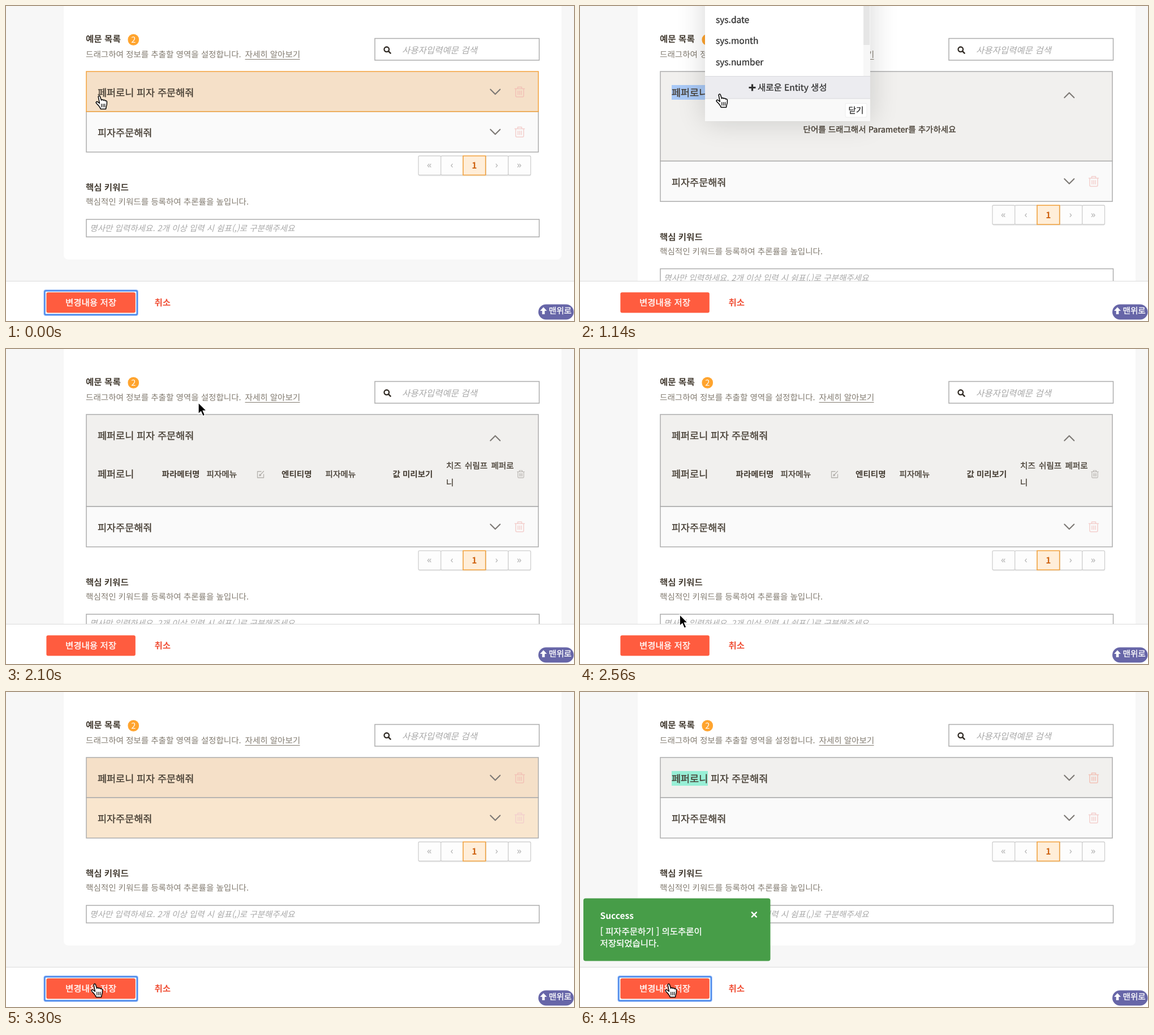
An HTML page for the animation above (4160 ms loop, 1004 px wide and 558 px high).

```html
<!DOCTYPE html>
<html lang="ko">
<head>
<meta charset="utf-8">
<title>예문 목록</title>
<style>
html, body { margin: 0; width: 100%; height: 100%; overflow: hidden; background: #f7f7f7; }
svg { display: block; width: 1004px; height: 558px; }
text {
  font-family: "Noto Sans CJK KR", "Noto Sans KR", "Noto Sans CJK JP", sans-serif;
  white-space: pre;
  text-rendering: geometricPrecision;
}
.b { font-weight: 700; }
.m { stroke-width: .35px; }
.i { font-style: italic; }
.line { fill: none; stroke-linecap: round; stroke-linejoin: round; }
.page { font-family: "Noto Sans", sans-serif; text-anchor: middle; }
</style>
</head>
<body>
<svg id="stage" viewBox="0 0 1004 558"></svg>
<script>
const LOOP = 4160;
const INK = '#453d33', SOFT = '#827b70', GRAY = '#adadad', HINT = '#a9a9a9';

// Class "m" thickens the regular weight with a hairline in the text colour.
const text = (x, y, size, fill, str, cls = '', more = '') =>
  `<text x="${x}" y="${y}" font-size="${size}" fill="${fill}" class="${cls}" ${cls === 'm' ? `stroke="${fill}"` : ''} ${more}>${str}</text>`;
const rect = (x, y, w, h, fill, more = '') =>
  `<rect x="${x}" y="${y}" width="${w}" height="${h}" fill="${fill}" ${more}/>`;
const line = (d, color, width, more = '') =>
  `<path class="line" d="${d}" stroke="${color}" stroke-width="${width}" ${more}/>`;
const group = (id, body, more = '') => `<g id="${id}" ${more}>${body}</g>`;
const frame = `stroke="${GRAY}" stroke-width="1.5"`;

const trash = (x, y, color, scale = 1) => line(
  'M-8.5 -5.5H8.5M-3.5 -5.5V-8.5H3.5V-5.5M-7 -5.5V7Q-7 9 -5 9H5Q7 9 7 7V-5.5M-3 -1.5V5M0 -1.5V5M3 -1.5V5',
  color, 1.5, `transform="translate(${x} ${y}) scale(${scale})"`);
const chevron = (x, y, dy) => line(`M${x - 8.5} ${y - dy}l8.5 ${2 * dy}l8.5 ${-2 * dy}`, '#7d7975', 2.1);

const header =
  text(141, 64, 15.6, INK, '예문 목록', 'b') +
  '<rect x="215.500" y="49.800" width="19.500" height="20" rx="9.500" fill="#ffa42e"/>' +
  text(225.3, 65.2, 14.5, '#fff', '2', '', 'text-anchor="middle"') +
  text(141, 91.3, 14.55, SOFT, '드래그하여 정보를 추출할 영역을 설정합니다.') +
  text(422.5, 91.3, 14.55, SOFT, '자세히 알아보기') +
  rect(422.5, 94, 97, 1, SOFT) +
  rect(652, 57.5, 290.5, 38.5, '#fff', frame) +
  '<circle cx="672.800" cy="76.800" r="4.300" fill="none" stroke="#332d27" stroke-width="2.300"/>' +
  line('M676.200 80.200l3.400 3.400', '#332d27', 2.6) +
  text(700, 84, 15.5, HINT, '사용자입력예문 검색', 'i');

const cells = ['«', '‹', '1', '›', '»'].map((s, k) => {
  const x = 729 + k * 39.7, mid = x + 19.8;
  return k === 2 ? '' :
    rect(x, 265.5, 39.7, 34, '#fdfdfd', 'rx="2" stroke="#cfcfcf" stroke-width="1.300"') +
    text(mid - .5, 287.3, 16.5, '#b2b2b2', s, 'page');
}).join('');

const below =
  rect(142, 187, 799, 71.7, '#fafafa', `id="row2" ${frame}`) +
  text(162, 231, 17.45, INK, '피자주문해줘', 'm') +
  chevron(864.8, 223, 4.3) + trash(908, 223, '#f3cfcd') +
  rect(729, 268, 199, 33.5, '#000', 'rx="3" opacity=".07"') + cells +
  rect(808, 265.5, 39.7, 34, '#ffeed9', 'stroke="#f2a443" stroke-width="1.600"') +
  text(827.8, 288, 15.5, '#cf6413', '1', 'b', 'text-anchor="middle"') +
  text(141, 327.3, 15.5, INK, '핵심 키워드', 'b') +
  text(141, 352.3, 14.55, SOFT, '핵심적인 키워드를 등록하여 추론률을 높입니다.') +
  rect(142, 378, 800.5, 31, '#fff', frame) +
  text(148, 399, 14.55, HINT, '명사만 입력하세요. 2개 이상 입력 시 쉼표(,)로 구분해주세요', 'i');

const param =
  text(162, 228.3, 17.45, INK, '페퍼로니', 'm') +
  text(275.5, 227.3, 14.55, INK, '파라메터명', 'b') +
  text(354.5, 227.3, 14.55, INK, '피자메뉴', 'm') +
  line('M451 217H444.500V228H455.500V222M448 224.500L455.500 216.500M448 224.500l.5 -2.500M448 224.500l2.500 -.5', '#b3b0ac', 1.3) +
  text(487, 227.3, 14.55, INK, '엔티티명', 'b') +
  text(564.5, 227.3, 14.55, INK, '피자메뉴', 'm') +
  text(683.5, 227.3, 14.55, INK, '값 미리보기', 'b') +
  text(778, 212.3, 14.55, INK, '치즈 쉬림프 페퍼로', 'm', 'word-spacing="2.200"') +
  text(778, 241.5, 14.55, INK, '니', 'm') +
  trash(910, 221.5, '#b8b4b0', .74);

const popup =
  rect(221, -60, 292, 264, '#000', 'filter="url(#wide)" opacity=".16"') +
  rect(221, -10, 292, 134, '#fff') +
  rect(501, 0, 12, 124, '#f7f7f7') + rect(501, 0, 11, 69, '#e6e6e6') +
  ['date', 'month', 'number'].map((s, k) => text(240, 30.3 + k * 37.1, 15.5, '#333', 'sys.' + s, 'm')).join('') +
  rect(221, 124, 292, 40, '#ececf0') + rect(221, 124, 292, 1, '#d9d9dd') +
  rect(221, 164, 292, 40, '#f9f9f9') + rect(221, 163.5, 292, 1, '#d9d9dd') +
  '<path d="M304.500 138.500v12M298.500 144.500h12" stroke="#333" stroke-width="3.200"/>' +
  text(314, 150, 15.5, '#333', '새로운 Entity 생성', 'm') +
  rect(469, 172.5, 38, 24.5, '#fff', 'rx="2" stroke="#ececec"') +
  text(474.5, 190.3, 14.55, '#333', '닫기', 'm');

const footer =
  rect(0, 487, 1004, 71, '#fff') + rect(0, 487, 1004, 1, '#dcdcdc') +
  group('hover',
    rect(68, 504, 164, 43, '#f3f4f7', 'rx="2"') +
    rect(71, 510, 158, 37, '#000', 'rx="3" filter="url(#near)" opacity=".48"')) +
  group('focus',
    rect(68.3, 504.3, 163.6, 42.6, '#fff', 'rx="2" stroke="#a9c8fa" stroke-width="4"') +
    rect(68.5, 504.5, 163.2, 42.2, '#fff', 'rx="2" stroke="#4a88ea" stroke-width="2.400"')) +
  rect(71.4, 507.2, 157.4, 36.4, '#ff5c3f', 'rx="3"') +
  text(105, 531.3, 15.5, '#fff', '변경내용 저장', 'm') +
  text(262.5, 531.3, 15.5, '#f0533a', '취소', 'b') +
  rect(941, 528.5, 62.5, 27, '#6766a8', 'rx="13.500"') +
  '<path d="M950 533.500l6 6.500h-3.700v6h-4.600v-6h-3.700z" fill="#fff"/>' +
  text(959.5, 544.5, 14.55, '#fff', '맨위로', 'm');

const toast =
  rect(6, 365.5, 330.5, 111, '#479d48', 'rx="4"') +
  text(35.5, 402, 15.5, '#fff', 'Success', 'b') +
  line('M303.800 390.300l8 8m0 -8l-8 8', '#fff', 2.4) +
  text(35.5, 429.5, 15.5, '#fff', '[ 피자주문하기 ] 의도추론이', 'm') +
  text(35.5, 451.3, 15.5, '#fff', '저장되었습니다.', 'm');

const edge = 'stroke="#000" stroke-width="1.500" stroke-linejoin="round"';
const hand =
  `<path fill="#fff" ${edge} d="M-.8 2.200C-1.400 0 1.600 -.8 2.400 1.400L4.600 8c.4-1.600 3-1.600 3.400.2.800-1.200 3-.8 3.200.8 1-.8 3.200-.2 3.200 1.600.2 3.400.2 5.200-1 8.200L12.400 23.500H3.400C2 19.600-1.400 16-4.400 13.200-5.800 11.400-3.600 9.400-1.600 11l3 2.400z"/>` +
  line('M4.800 14.500v5.500M7.800 14.500v5.500M10.600 14.500v5.500', '#000', 1.2);
const arrow =
  '<path fill="#000" stroke="#fff" stroke-width="1.300" d="M0 0V20L4.600 15.800L8 23.800L11.600 22.200L8.200 14.400H14.300Z"/>';

const stage = document.getElementById('stage');
stage.innerHTML =
  `<defs>
    <filter id="wide" x="-50%" y="-50%" width="200%" height="200%"><feGaussianBlur stdDeviation="26"/></filter>
    <filter id="near" x="-20%" y="-50%" width="140%" height="200%"><feGaussianBlur stdDeviation="3"/></filter>
  </defs>` +
  rect(0, 0, 1004, 558, '#f7f7f7') +
  rect(102, -20, 880, 469, '#fff', 'id="card" rx="8"') +
  header +
  group('below', below) +
  rect(142, 116, 799, 71, '#f1f0ee', 'id="row1" stroke-width="1.500"') +
  rect(162, 140, 64, 26, '#a9c9f6', 'id="mark"') +
  text(162, 159.7, 17.45, INK, '페퍼로니 피자 주문해줘', 'm') +
  group('closed', chevron(864.8, 152, 4.3) + trash(908, 152, '#f2c1b6')) +
  group('opened', chevron(864.8, 158, -4.3)) +
  group('guide', text(394.5, 224, 14.55, INK, '단어를 드래그해서 Parameter를 추가하세요', 'm')) +
  group('param', param) +
  group('popup', popup) +
  footer +
  group('toast', toast) +
  group('hand', hand) + group('arrow', arrow);

const el = {};
stage.querySelectorAll('[id]').forEach(n => el[n.id] = n);

const clamp = v => Math.max(0, Math.min(1, v));
const ease = v => v * v * (3 - 2 * v);
const ramp = (t, a, b) => ease(clamp((t - a) / (b - a)));

// Each key is [time, ...values].
function track(keys, t, curve = ease) {
  let k = 0;
  while (k < keys.length - 2 && t >= keys[k + 1][0]) k++;
  const [a, b] = [keys[k], keys[k + 1]];
  const p = curve(clamp((t - a[0]) / (b[0] - a[0])));
  return a.slice(1).map((v, n) => v + (b[n + 1] - v) * p);
}

function mix(from, to, p) {
  return `rgb(${from.map((v, n) => Math.round(v + (to[n] - v) * p))})`;
}

const path = [
  [0, 164, 159], [420, 164, 159], [580, 163, 154], [840, 226, 153], [960, 226, 153],
  [1140, 246, 156], [1220, 246, 156], [1500, 268, 100], [1720, 268, 100],
  [2000, 340, 95], [2180, 340, 95], [2660, 156, 517], [LOOP, 156, 517]
];
const toastKeys = [[3490, 28, 0], [3560, 10.8, .86], [3660, 0, 1]];

const show = (id, on) => el[id].setAttribute('opacity', +on);
const move = (id, x, y) => el[id].setAttribute('transform', `translate(${x} ${y})`);
const set = (id, attrs) => Object.entries(attrs).forEach(([k, v]) => el[id].setAttribute(k, v));

function render(t) {
  const added = t >= 1720, saved = t >= 3500;
  const open = ramp(t, 300, 420) * (1 - ramp(t, 3120, 3220));
  const isOpen = t >= 300 && t < 3160;
  const shift = open * (added ? 91.8 : 87.5);
  const hot = t < 300;
  const flash = ramp(t, 3180, 3260) * (1 - ramp(t, 3360, 3500));

  set('card', { height: 469 + shift });
  move('below', 0, shift);
  set('row1', {
    height: 71 + shift,
    fill: mix([241, 240, 238], [245, 224, 200], hot ? 1 : flash),
    stroke: hot ? '#f3a33d' : GRAY
  });
  set('row2', { fill: mix([250, 250, 250], [249, 230, 206], flash) });

  const width = saved ? 64 : t >= 580 && t < 1720 ? 64 * ramp(t, 580, 840) : 0;
  set('mark', { width, fill: saved ? '#98efd6' : '#a9c9f6' });

  show('closed', !isOpen);
  show('opened', isOpen);
  show('guide', isOpen && !added ? open : 0);
  show('param', isOpen && added ? open : 0);
  show('popup', t >= 900 && !added);

  show('focus', t < 300 || t >= 3000);
  show('hover', t < 3000 ? ramp(t, 2640, 2780) : 0);

  const [drop, alpha] = track(toastKeys, t, v => v);
  move('toast', 0, drop);
  show('toast', alpha);

  const [x, y] = track(path, t);
  const pointing = t < 1760 || t >= 2620;
  move('hand', x, y);
  move('arrow', x, y);
  show('hand', pointing);
  show('arrow', !pointing);
}

const start = performance.now();
function tick() {
  render((performance.now() - start) % LOOP);
  requestAnimationFrame(tick);
}
tick();
</script>
</body>
</html>
```
